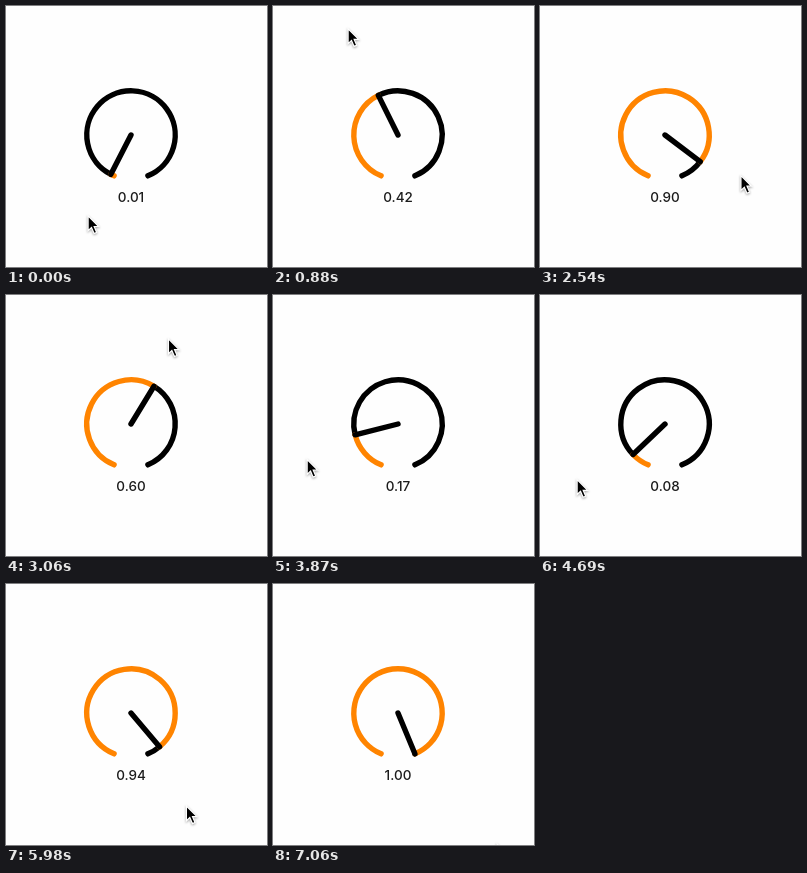
These frames come from a looping animation (261x261 px, 7.27 s). An HTML page:

```html
<!DOCTYPE html>
<html lang="en">
<head>
<meta charset="utf-8">
<title>Dial</title>
<style>
  html, body { margin: 0; width: 100%; height: 100%; overflow: hidden; background: #fefefe; }
  svg { display: block; width: 100%; height: 100%; }
  .dial path { fill: none; stroke: #000; stroke-width: 5.4; stroke-linecap: round; }
  .dial .fill { stroke: #ff8400; }
  text { font: 450 13.5px Inter, Roboto, sans-serif; fill: #1c1c1c; text-anchor: middle; }
  .pointer { stroke: #fff; stroke-width: 1.2; filter: drop-shadow(0 1px 1px rgba(0, 0, 0, .35)); }
</style>
</head>
<body>
<svg viewBox="0 0 261 261">
  <g class="dial">
    <path class="rest"/>
    <path class="fill"/>
    <path class="needle"/>
  </g>
  <text x="125" y="196"></text>
  <path class="pointer" d="M0 0V14.8L3.4 11.6L6 17.6L8.6 16.5L6.1 10.6H10.6Z"/>
</svg>
<script>
const LOOP = 7270, LAG = 40, RELEASE = 6110;
const CX = 125, CY = 129, R = 44.2, START = 202.5, SWEEP = 315;

// Drag around the dial: time, degrees from the top, distance from the centre
const drag = [
  [30, -152.9, 92], [450, -90, 78], [840, -26.5, 115], [880, -25, 116],
  [1480, 64.6, 86], [1840, 135.4, 104], [2120, 158, 108],
  [2270, 158, 108], [2680, 90, 80], [3020, 31.5, 92],
  [3830, -104, 97], [3870, -112, 97], [4350, -155.6, 110],
  [4500, -155.6, 110], [4850, -82, 99], [5300, 1.8, 138],
  [5680, 70, 101], [RELEASE, 164, 112]
];

const $ = s => document.querySelector(s);
const rad = deg => deg * Math.PI / 180;
const clamp = (v, lo, hi) => Math.min(hi, Math.max(lo, v));
const slope = (i, k) => (drag[i + 1][k] - drag[i][k]) / (drag[i + 1][0] - drag[i][0]);

function ease(t, from, to) {
  const u = clamp((t - from) / (to - from), 0, 1);
  return u * u * (3 - 2 * u);
}

// Monotone tangent: rests and turning points stay flat
function tangent(i, k) {
  if (i === 0 || i === drag.length - 1) return 0;
  const a = slope(i - 1, k), b = slope(i, k);
  return a * b > 0 ? 2 * a * b / (a + b) : 0;
}

function polarAt(t) {
  t = clamp(t, drag[0][0], RELEASE);
  const i = Math.max(1, drag.findIndex(p => p[0] >= t)) - 1;
  const h = drag[i + 1][0] - drag[i][0], u = (t - drag[i][0]) / h, v = 1 - u;
  return [1, 2].map(k =>
    drag[i][k] * (1 + 2 * u) * v * v + tangent(i, k) * h * u * v * v
    + drag[i + 1][k] * u * u * (3 - 2 * u) - tangent(i + 1, k) * h * u * u * v);
}

function pointerAt(t) {
  const [deg, dist] = polarAt(t);
  const nudge = ease(t, 6290, 6460), leave = ease(t, 6730, 7060);
  return [
    CX - 1 + dist * Math.sin(rad(deg)) + 5 * nudge + 64 * leave,
    CY - 1 - dist * Math.cos(rad(deg)) + 24 * leave
  ];
}

const valueAt = t => clamp((polarAt(t - LAG)[0] + 360 - START) / SWEEP, 0, 1);

function rim(v) {
  const a = rad(START + v * SWEEP);
  return `${(CX + R * Math.sin(a)).toFixed(2)} ${(CY - R * Math.cos(a)).toFixed(2)}`;
}

const arc = (a, b) => `M${rim(a)}A${R} ${R} 0 ${(b - a) * SWEEP > 180 ? 1 : 0} 1 ${rim(b)}`;

function draw(t) {
  const v = valueAt(t), [x, y] = pointerAt(t);
  $('.fill').setAttribute('d', arc(0, v));
  $('.rest').setAttribute('d', arc(v, 1));
  $('.needle').setAttribute('d', `M${CX} ${CY}L${rim(v)}`);
  $('text').textContent = v.toFixed(2);
  $('.pointer').setAttribute('transform', `translate(${x.toFixed(2)} ${y.toFixed(2)})`);
}

const begin = performance.now();
function tick() {
  draw((performance.now() - begin) % LOOP);
  requestAnimationFrame(tick);
}
tick();
</script>
</body>
</html>
```
